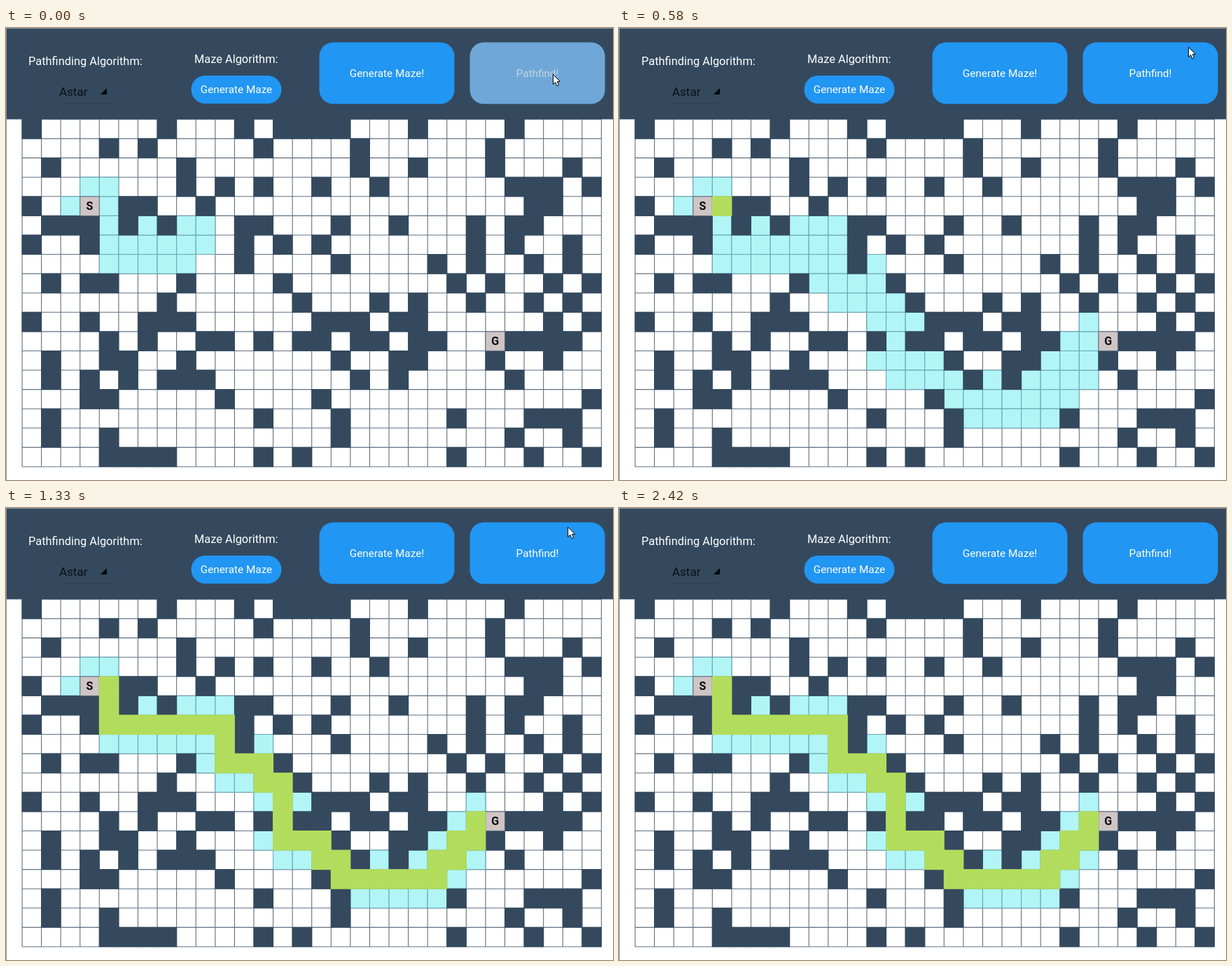
Recreate the animation shown at these times as an HTML page with a canvas. Size 867 by 646 pixels, loop 2.79 s.

```html
<!DOCTYPE html>
<html lang="en">
<head>
<meta charset="utf-8">
<title>Pathfinding</title>
<style>
  html, body { margin: 0; width: 100%; height: 100%; overflow: hidden; background: #fff; }
  canvas { display: block; }
</style>
</head>
<body>
<canvas id="stage" width="867" height="646"></canvas>
<script>
const ctx = document.getElementById('stage').getContext('2d');
const LOOP = 2790;
const COLS = 30, ROWS = 18, CELL = 27.58, LEFT = 23, TOP = 130.5;
const SLATE = '#34495e', BLUE = '#2196f3', GRID = '#5f7082';

const maze = [
  '#......#...#.####...#....#....',
  '....#.#.....#....#......#.....',
  '.#......#........#..#...#...#.',
  '........#.#.#..#..#......###.#',
  '#....##..#................##..',
  '.###.#.#...##...#..#...#.##...',
  '#..#.......#.#.#.......#.#..#.',
  '...........#....#....#.#..#.#.',
  '.#.##...#....#........#.#..#.#',
  '.......#......#...#.#..#..#.#.',
  '#..#..###......###.##......#.#',
  '....#.#..##.#.##.##.##...####.',
  '.#..##..#.......#..##...#..#..',
  '.#.#.#.###.......#.#.....#....',
  '...##.....#....#.............#',
  '.#..........#...#.....#...###.',
  '.#..#...........#........#..#.',
  '....####....#.#.......#...#..#'
];
const start = [3, 4], goal = [24, 11];
const moves = { U: [0, -1], D: [0, 1], L: [-1, 0], R: [1, 0] };
const route = 'RDDRRRRRRDDRRDRDDDRRDRDRRRRRURURU';

// Cells along the route, and the open cells met while walking it.
const path = [];
const visited = [];
function search() {
  const seen = new Set([String(start), String(goal)]);
  const expand = ([x, y]) => {
    for (const [dx, dy] of Object.values(moves)) {
      const next = [x + dx, y + dy];
      if (maze[next[1]][next[0]] === '#' || seen.has(String(next))) continue;
      seen.add(String(next));
      visited.push(next);
    }
  };
  let cell = start;
  expand(cell);
  for (const m of route) {
    cell = [cell[0] + moves[m][0], cell[1] + moves[m][1]];
    path.push(cell);
    expand(cell);
  }
}
search();

// [time, cells painted so far]
const progress = [[70, 19], [230, 36], [440, 57], [620, 73], [730, 83], [910, 100]];
// [time, x, y] of the pointer tip
const pointer = [
  [70, 781, 66], [230, 663, 22], [410, 813, 27], [1300, 813, 27], [1450, 759, 26],
  [1670, 759, 26], [1700, 756, 26], [1790, 736, 52], [1950, 667, 200], [2060, 641, 320], [2150, 650, 441]
];
const pointerExit = [[2240, 850, 635], [2330, 858, 641]];
// [from, step length]: the picture advances in steps
const ticks = [[0, 100], [100, 40], [140, 30], [640, 30], [1330, 30], [1700, 30], [2240, 30]];

function stepTime(t) {
  const [from, len] = ticks.filter(k => k[0] <= t).pop();
  return from + Math.floor((t - from) / len) * len;
}

function sample(keys, t) {
  if (t <= keys[0][0]) return keys[0].slice(1);
  for (let i = 1; i < keys.length; i++) {
    const a = keys[i - 1], b = keys[i];
    if (t <= b[0]) {
      const p = (t - a[0]) / (b[0] - a[0]);
      return a.slice(1).map((v, j) => v + (b[j + 1] - v) * p);
    }
  }
  return keys[keys.length - 1].slice(1);
}

function rect(x, y, w, h, color) {
  ctx.fillStyle = color;
  ctx.fillRect(x, y, w, h);
}

function pill(x, y, w, h, r, color) {
  ctx.fillStyle = color;
  ctx.beginPath();
  ctx.roundRect(x, y, w, h, r);
  ctx.fill();
}

function text(str, x, y, size, color, align = 'left', weight = 400) {
  ctx.font = `${weight} ${size}px Roboto, sans-serif`;
  ctx.textAlign = align;
  ctx.fillStyle = color;
  ctx.fillText(str, x, y);
}

function polygon(points) {
  ctx.beginPath();
  points.forEach(([x, y]) => ctx.lineTo(x, y));
  ctx.closePath();
}

function fillCell([c, r], color, line) {
  const x = LEFT + c * CELL, y = TOP + r * CELL;
  if (!line) return rect(x - 0.5, y - 0.5, CELL + 1, CELL + 1, color);
  rect(x, y, CELL, CELL, color);
  ctx.strokeStyle = line;
  ctx.strokeRect(x, y, CELL, CELL);
}

function drawBoard(painted) {
  ctx.lineWidth = 1.1;
  ctx.strokeStyle = GRID;
  ctx.beginPath();
  for (let c = 0; c <= COLS; c++) {
    ctx.moveTo(LEFT + c * CELL, TOP);
    ctx.lineTo(LEFT + c * CELL, TOP + ROWS * CELL);
  }
  for (let r = 0; r <= ROWS; r++) {
    ctx.moveTo(LEFT, TOP + r * CELL);
    ctx.lineTo(LEFT + COLS * CELL, TOP + r * CELL);
  }
  ctx.stroke();

  visited.slice(0, painted).forEach(cell => fillCell(cell, '#b2f5f7', '#6aa9b6'));
  maze.forEach((row, r) => [...row].forEach((ch, c) => {
    if (ch === '#') fillCell([c, r], SLATE);
  }));
  [[start, 'S'], [goal, 'G']].forEach(([cell, label]) => {
    fillCell(cell, '#d0c5c5', GRID);
    text(label, LEFT + (cell[0] + 0.5) * CELL, TOP + (cell[1] + 0.5) * CELL + 5.3, 16, '#0b0b0b', 'center', 700);
  });
  path.slice(0, Math.max(0, painted - visited.length)).forEach(cell => fillCell(cell, '#b2dd5c'));
}

function drawHeader(busy) {
  rect(0, 0, 867, 130.5, SLATE);
  text('Pathfinding Algorithm:', 32, 53, 16.4, '#fff');
  text('Maze Algorithm:', 269, 50, 16.4, '#fff');
  text('Astar', 76, 97, 17, '#0c1116');
  rect(76, 107.5, 75, 1, 'rgba(0,0,0,.14)');
  polygon([[135, 95], [144, 86], [144, 95]]);
  ctx.fillStyle = '#05080a';
  ctx.fill();
  pill(264.5, 68, 129, 40, 20, BLUE);
  text('Generate Maze', 329, 93, 15.3, '#fff', 'center');
  pill(447.5, 20.5, 193, 88, 20, BLUE);
  text('Generate Maze!', 544, 70, 15.3, '#fff', 'center');
  pill(662.5, 20.5, 193, 88, 20, busy ? '#6fa8d8' : BLUE);
  text('Pathfind!', 759, 70, 15.3, busy ? '#c3d3e1' : '#fff', 'center');
}

function drawPointer([x, y]) {
  ctx.save();
  ctx.translate(x + 0.5, y + 0.5);
  polygon([[0, 0], [0, 14], [3.2, 11], [5.5, 16.3], [8, 15.2], [5.8, 10.2], [10, 10]]);
  ctx.fillStyle = '#fff';
  ctx.fill();
  ctx.lineWidth = 1;
  ctx.strokeStyle = '#000';
  ctx.stroke();
  ctx.restore();
}

function draw(t) {
  rect(0, 0, 867, 646, '#fff');
  drawBoard(Math.round(sample(progress, t)[0]));
  drawHeader(t < 320);
  rect(0, 0, 867, 1, '#8b949c');
  rect(0, 0, 1, 646, '#8b949c');
  if (t < 2180) drawPointer(sample(pointer, t));
  else if (t >= 2240 && t < 2420) drawPointer(sample(pointerExit, t));
}

const began = performance.now();
function frame() {
  draw(stepTime((performance.now() - began) % LOOP));
  requestAnimationFrame(frame);
}
frame();
</script>
</body>
</html>
```
